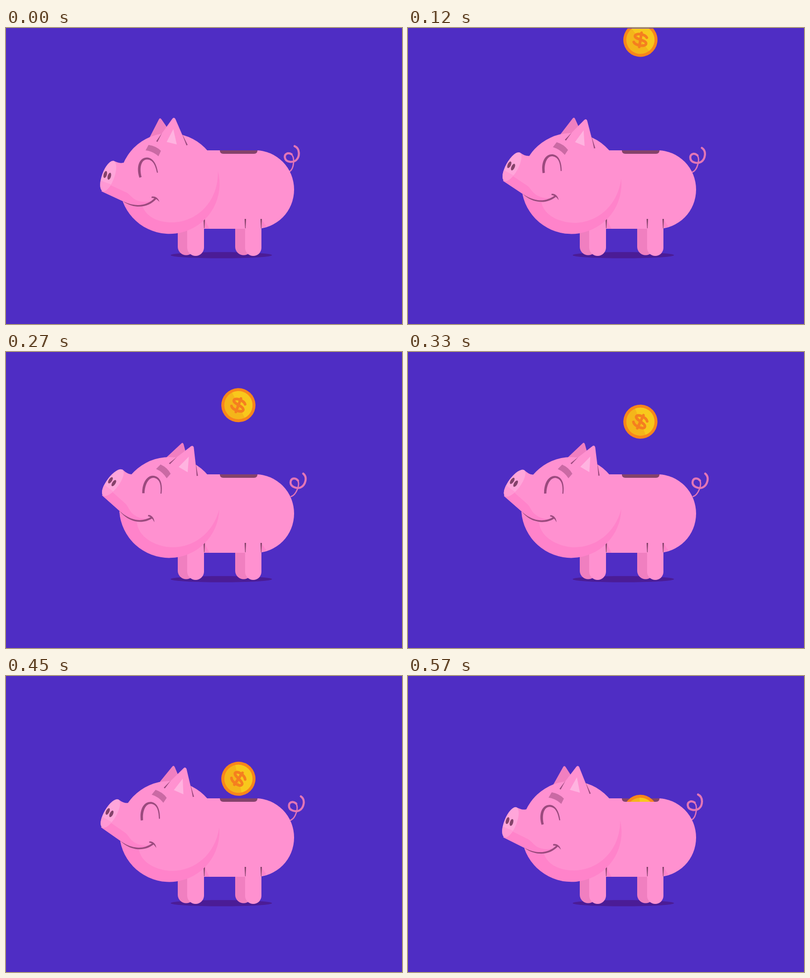
An HTML page for the animation above (600 ms loop, 800 by 600 pixels).

```html
<!DOCTYPE html>
<html lang="en">
<head>
<meta charset="utf-8">
<title>Piggy bank</title>
<style>
  html, body { margin: 0; width: 100%; height: 100%; overflow: hidden; background: #4f2dc4; }
  svg { display: block; width: 100%; height: 100%; }
  .skin { fill: #ff91d0; }
  .shade { fill: #ff83ca; }
  .far { fill: #f07fc0; }
  .line { fill: #9b4a7e; }
  .dark { fill: #84426a; }
  .tail { fill: none; stroke: #e376b6; stroke-linecap: round; }
  .dollar { fill: none; stroke: #f57f1f; stroke-width: 5.5; stroke-linecap: round; }
</style>
</head>
<body>
<svg viewBox="0 0 800 600">
  <defs>
    <clipPath id="opening">
      <path d="M400,1 H540 V248 H508 Q508,255 501,255 H439 Q432,255 432,248 H400 Z"/>
    </clipPath>
  </defs>

  <ellipse cx="435" cy="460.5" rx="102.5" ry="6.3" fill="#4b1c96"/>

  <g id="tail" class="tail">
    <path stroke-width="2.6" d="M573,291 C582,285 584,262 576,255.500 C569,251 562,256 563.500,263"/>
    <path stroke-width="4.200" d="M577,256 C569,251 562,256 563.500,263 C565,273 580,273 586,268 C594,261 594,244 583,239.500"/>
  </g>

  <!-- legs and body -->
  <rect class="far" x="347" y="380" width="34" height="80.500" rx="17"/>
  <rect class="far" x="463" y="380" width="34" height="80.500" rx="17"/>
  <path class="skin" d="M380,248 H504 A78,79.500 0 0 1 504,407 H380 Z"/>
  <path class="shade" d="M402,389 L411,407 H402 Z M517,389 L526,402 L517,404.500 Z"/>
  <rect class="skin" x="366" y="370" width="34" height="92" rx="17"/>
  <rect class="skin" x="483" y="370" width="33" height="92" rx="16.500"/>
  <path class="dark" d="M399,387 h3 l-1,19 h-1 Z M482,387 h3 l-1,19 h-1 Z M514,387 h3 l-1,19 h-1 Z"/>
  <path class="dark" d="M432,248 H508 Q508,255 501,255 H439 Q432,255 432,248 Z"/>

  <g clip-path="url(#opening)">
    <g id="coin">
      <circle r="34.500" fill="#f9851b"/>
      <circle r="28.500" fill="#f4b51a"/>
      <path d="M-28.500,0 A28.500,28.500 0 0 1 28.500,0 Z" fill="#f8c81c" transform="rotate(43)"/>
      <path class="dollar" d="M12,-6.500 C7,-13 -12,-13 -12,-6 C-12,1 12.500,-2 12.500,6 C12.500,13 -8,13 -12.500,6.500 M0,-14.500 V14.500"/>
    </g>
  </g>

  <path id="backEar" class="far" d="M288,226 L309,185 Q311,181 314,185 L334,214 L330,240 Z"/>

  <g id="head">
    <circle class="skin" cx="330" cy="314" r="101"/>
    <path class="skin" d="M217,269 C224,272 230,275 237,273 L280,300 L270,360 L236,351 L193,331 Z"/>
    <path class="shade" d="M276,362 C285,385 310,394 335,394 C385,394 430,352 428,290
      A101,101 0 0 1 236,352 C250,361 262,364 276,362 Z"/>
    <path class="shade" d="M193,331 L210,318 L240,332 C254,337 254,352 282,352.500 Q294,352 303,346
      C285,366 258,365 236,351 Z"/>

    <g transform="translate(206.500 300) rotate(20)">
      <ellipse rx="12.500" ry="32.500" fill="#ffa6da"/>
      <path d="M-11.300,14 A12.500,32.500 0 0 0 11.300,14 Z" fill="#ff98d4"/>
    </g>
    <ellipse class="dark" rx="3.300" ry="7.200" transform="translate(200.500 297) rotate(16)"/>
    <ellipse class="dark" rx="3.300" ry="7.200" transform="translate(208.700 300.500) rotate(16)"/>

    <path class="line" d="M236,351 C258,367 287,366 304.500,345.500 L301,344 C284,362 260,363 236,351 Z"/>
    <path class="line" d="M294,342 C301,340 308,345 310,352.500 C305,347 301,344.500 294,344.500 Z"/>
    <path class="line" d="M269.500,303.500 C262,280 270,262.500 285,262.500 C299,263 305,280 307,293
      L305,293.500 C302,279 297,266.500 285,266.500 C273,266.500 269,284 274,302 Z"/>
    <path fill="#ca6aa4" d="M288,237 Q303,239 313,249 L308,260 Q297,250 282,248 Z"/>

    <path class="skin" d="M306,226 L336,184 Q339,180 342,184 L361,228 Z"/>
    <path fill="#ffb3e0" d="M338,205 L345,236 L324.500,231 Z"/>
    <path class="line" d="M315,213 L306,231 L303.500,229.500 Z M355,213 L367,237 L364.500,238 Z"/>
  </g>
</svg>
<script>
  const LOOP = 600, STEP = 30, SWING = 17;
  const [tail, coin, backEar, head] = ["tail", "coin", "backEar", "head"]
    .map(id => document.getElementById(id));

  const smooth = u => u * u * (3 - 2 * u);
  const ease = u => 0.6 * Math.sin(u * Math.PI / 2) + 0.4 * smooth(u);
  const turn = (el, angle, x, y) => el.setAttribute("transform", `rotate(${angle} ${x} ${y})`);

  function draw() {
    const t = Math.floor(performance.now() % LOOP / STEP) * STEP;
    const nod = ease(t < 285 ? t / 285 : (LOOP - t) / 315);
    turn(head, SWING * nod, 330, 314);
    turn(backEar, (SWING + 3) * nod, 330, 314);
    turn(tail, SWING * Math.sin(Math.PI * t / LOOP), 568, 302);
    coin.setAttribute("transform", `translate(469.5 ${0.5585 * t - 43}) rotate(${0.076 * t})`);
    requestAnimationFrame(draw);
  }
  draw();
</script>
</body>
</html>
```
